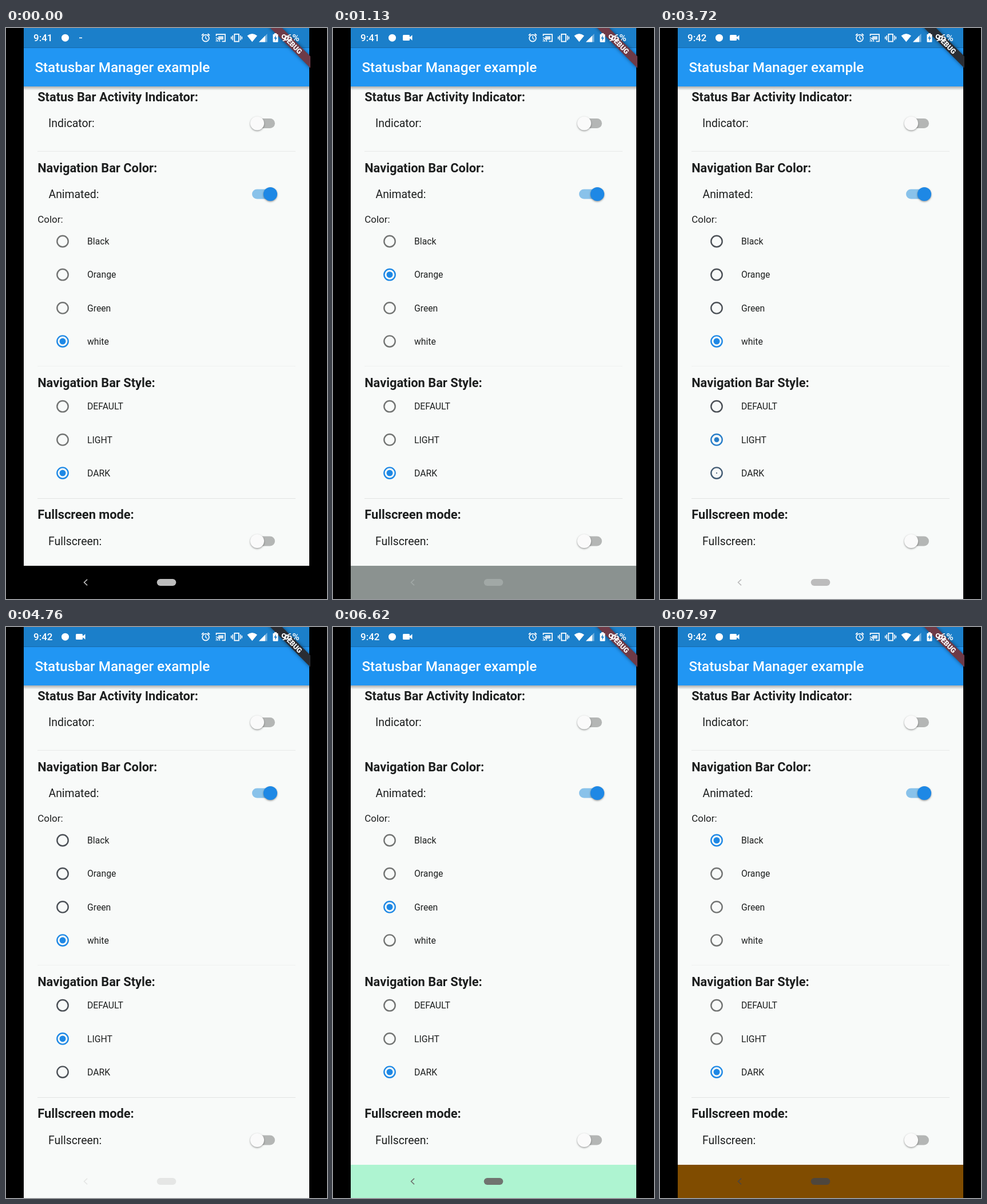
Recreate the animation shown at these times as an HTML page with a canvas. Size 561 by 997 pixels, loop 8000 ms.

```html
<!DOCTYPE html>
<html lang="en">
<head>
<meta charset="utf-8">
<title>Statusbar Manager example</title>
<style>
  html, body { margin: 0; width: 100%; height: 100%; overflow: hidden; background: #000; }
  canvas { display: block; width: 561px; height: 997px; }
</style>
</head>
<body>
<canvas id="stage"></canvas>
<script>
const W = 561, H = 997, LOOP = 8000, STEP = 60;
const LEFT = 31, RIGHT = 530, DP = 1.2125;
const PAGE = '#f8faf9', ACTIVE = '#1e88e5';
const canvas = document.getElementById('stage');
const ctx = canvas.getContext('2d');
const dpr = window.devicePixelRatio || 1;
canvas.width = W * dpr;
canvas.height = H * dpr;

const colors = ['Black', 'Orange', 'Green', 'white'];
const styles = ['DEFAULT', 'LIGHT', 'DARK'];

// Taps: start, steps until settled, resulting changes
const taps = [
  { at: 60, steps: 5, color: 0 },
  { at: 950, steps: 4, color: 1, bar: '#8b9290', keys: '#a1a8a6' },
  { at: 1190, steps: 1, bar: '#ff9800', keys: '#ffdcae' },
  { at: 1850, steps: 5, color: 3, bar: PAGE, keys: '#f4f5f4' },
  { at: 3060, steps: 4, style: 1 },
  { at: 3720, steps: 4, style: 2, keys: '#838383' },
  { at: 4640, steps: 4, style: 1, keys: '#f4f5f4' },
  { at: 5210, steps: 3, style: 0 },
  { at: 5600, steps: 4, style: 2, keys: '#838383' },
  { at: 6490, steps: 5, color: 2, bar: '#7cf0b6', keys: '#6b706b' },
  { at: 7160, steps: 5, color: 1, bar: '#ff9800', keys: '#6f6252' },
  { at: 7850, steps: 6, color: 0, bar: '#000000', keys: '#403a34' }
];

const clamp = v => Math.max(0, Math.min(1, v));
const rgb = c => c[0] === '#'
  ? [1, 3, 5].map(i => parseInt(c.slice(i, i + 2), 16))
  : c.match(/[\d.]+/g).map(Number);

function mix(a, b, p) {
  const to = rgb(b);
  return 'rgb(' + rgb(a).map((v, i) => Math.round(v + (to[i] - v) * p)).join(',') + ')';
}

function stateAt(t) {
  const s = { color: [0, 0, 0, 1], style: [0, 0, 1], bar: '#000000', keys: '#bdbdbd' };
  for (const tap of taps) {
    if (t < tap.at) break;
    const step = Math.floor((t - tap.at) / STEP + 0.001) + 1;
    const p = clamp(step / tap.steps);
    const dot = clamp(0.2 + 0.4 * (step - 1));
    for (const group of ['color', 'style']) {
      if (group in tap) s[group] = s[group].map((v, i) => v + ((i === tap[group]) - v) * dot);
    }
    if (tap.bar) s.bar = mix(s.bar, tap.bar, p);
    if (tap.keys) s.keys = mix(s.keys, tap.keys, Math.sqrt(p));
  }
  return s;
}

function rect(x, y, w, h, fill) {
  ctx.fillStyle = fill;
  ctx.fillRect(x, y, w, h);
}

function disc(x, y, r, fill) {
  ctx.fillStyle = fill;
  ctx.beginPath();
  ctx.arc(x, y, r, 0, Math.PI * 2);
  ctx.fill();
}

function pill(x, y, w, h, r, fill) {
  ctx.fillStyle = fill;
  ctx.beginPath();
  ctx.roundRect(x, y, w, h, r);
  ctx.fill();
}

function line(points, color, width) {
  ctx.strokeStyle = color;
  ctx.lineWidth = width;
  ctx.beginPath();
  points.forEach(([x, y]) => ctx.lineTo(x, y));
  ctx.stroke();
}

function poly(points, fill) {
  ctx.fillStyle = fill;
  ctx.beginPath();
  points.forEach(([x, y]) => ctx.lineTo(x, y));
  ctx.fill();
}

function arc(x, y, r, from, to, color, width) {
  ctx.strokeStyle = color;
  ctx.lineWidth = width;
  ctx.beginPath();
  ctx.arc(x, y, r, from, to);
  ctx.stroke();
}

function text(str, x, y, sp, weight = 400, fill = '#1d1f1f') {
  ctx.font = `${weight} ${sp * DP}px Roboto, sans-serif`;
  ctx.fillStyle = fill;
  ctx.fillText(str, x, y);
}

function shadow(color, blur, dy) {
  ctx.shadowColor = color;
  ctx.shadowBlur = blur * dpr;
  ctx.shadowOffsetY = dy * dpr;
}

function toggle(y, on) {
  pill(430, y - 8.5, 40, 17, 8.5, on ? '#89c2ea' : '#b4b6b5');
  ctx.save();
  shadow('rgba(0,0,0,.4)', 3, 1.3);
  disc(on ? 462 : 439, y, 12.1, on ? ACTIVE : '#fafafa');
  ctx.restore();
}

function radio(y, on, ink) {
  const c = mix(ink, ACTIVE, on);
  arc(99, y, 9.7, 0, Math.PI * 2, c, 2.4);
  if (on > 0) disc(99, y, 5.5 * on, c);
}

function radios(labels, amounts, top, ink) {
  labels.forEach((label, i) => {
    const y = top + i * 48 * DP;
    radio(y, amounts[i], ink);
    text(label, 142, y + 5.6, 13);
  });
}

function page(t, s) {
  const ink = t >= 1970 && t < 6490 ? '#4b5056' : '#727473';
  rect(LEFT, 102, RIGHT - LEFT, 837, PAGE);
  if (t < 6490 || t >= 7410) {
    rect(55, 214.8, 451, 1, '#e6e8e7');
    rect(55, 590, 451, 1, '#eff1f0');
    rect(55, 821, 451, 1, '#e1e3e2');
  }
  text('Status Bar Activity Indicator:', 55.2, 128, 18, 700);
  text('Indicator:', 74, 173.3, 16);
  toggle(166.5, false);

  text('Navigation Bar Color:', 55.2, 251.7, 18, 700);
  text('Animated:', 74.5, 296.8, 16);
  toggle(290, true);
  text('Color:', 55.2, 340, 14);
  radios(colors, s.color, 372.5, ink);

  text('Navigation Bar Style:', 55.2, 627.2, 18, 700);
  radios(styles, s.style, 660.7, ink);

  text('Fullscreen mode:', 55.2, 857.3, 18, 700);
  text('Fullscreen:', 74, 903, 16);
  toggle(896, false);
}

function appBar() {
  const g = ctx.createLinearGradient(0, 102, 0, 109);
  g.addColorStop(0, 'rgba(0,0,0,.3)');
  g.addColorStop(1, 'rgba(0,0,0,0)');
  rect(LEFT, 102, RIGHT - LEFT, 7, g);
  rect(LEFT, 0, RIGHT - LEFT, 34.5, '#1b7fca');
  rect(LEFT, 34.5, RIGHT - LEFT, 67.5, '#2196f3');
  text('Statusbar Manager example', 50.4, 77.3, 20, 500, '#fff');
}

function ribbon(t) {
  ctx.save();
  ctx.beginPath();
  ctx.rect(LEFT, 0, 501, 120);
  ctx.clip();
  ctx.translate(530.5, 0);
  ctx.rotate(Math.PI / 4);
  shadow('rgba(0,0,0,.5)', 6, 0);
  rect(-52, 28 * DP, 104, 12 * DP, t >= 1970 && t < 6490 ? '#2a2d33' : '#6e3a47');
  shadow('transparent', 0, 0);
  ctx.textAlign = 'center';
  text('DEBUG', 0, 45.6, 10.2, 900, '#fff');
  ctx.restore();
}

function statusIcons(t) {
  const c = '#fff';
  text(t < 3060 ? '9:41' : '9:42', 48, 23.4, 14, 500, c);
  disc(103.5, 17.2, 6.5, c);
  if (t < 60) {
    rect(128, 16.5, 5, 1.6, c);
  } else {
    pill(122, 12, 12, 10, 1.5, c);
    poly([[134, 16], [138.5, 12.2], [138.5, 21.8], [134, 18]], c);
  }

  // Alarm clock
  arc(349, 17.8, 5.9, 0, Math.PI * 2, c, 1.7);
  line([[349, 14], [349, 18], [351.8, 20]], c, 1.4);
  line([[342, 13], [345.4, 10]], c, 1.7);
  line([[356, 13], [352.6, 10]], c, 1.7);

  // Cast
  line([[367.5, 14], [367.5, 11.2], [383, 11.2], [383, 23.3], [377.5, 23.3]], c, 1.7);
  for (const r of [3.6, 6.8]) arc(366.8, 24, r, -Math.PI / 2, 0, c, 1.5);
  poly([[366.8, 22], [368.8, 24], [366.8, 24]], c);
  rect(371, 14.3, 9, 6, 'rgba(255,255,255,.8)');

  // Vibrate
  ctx.strokeStyle = c;
  ctx.lineWidth = 1.8;
  ctx.strokeRect(399.3, 10.8, 7.6, 12.8);
  for (const d of [-1, 1]) {
    line([[403 + d * 6.8, 13], [403 + d * 6.8, 21.5]], c, 1.6);
    line([[403 + d * 9.3, 15], [403 + d * 9.3, 19.5]], c, 1.6);
  }

  // Wi-Fi and signal
  ctx.fillStyle = c;
  ctx.beginPath();
  ctx.moveTo(421.5, 13.5);
  ctx.quadraticCurveTo(430.3, 6.5, 439, 13.5);
  ctx.lineTo(430.3, 24.3);
  ctx.fill();
  poly([[442, 24.5], [456.5, 10], [456.5, 24.5]], 'rgba(255,255,255,.4)');
  poly([[442, 24.5], [453, 13.5], [453, 24.5]], c);

  // Battery
  pill(466.5, 10.8, 9, 14, 1, c);
  rect(469, 9, 4, 2, c);
  poly([[471.8, 12.5], [468.3, 18.6], [470.6, 18.6], [470.2, 23], [473.8, 16.8], [471.4, 16.8]], '#1b7fca');
  text('96%', 481, 23.4, 14, 500, c);
}

function navBar(s) {
  rect(LEFT, 939, RIGHT - LEFT, 58, s.bar);
  pill(263.7, 962, 33.6, 12, 6, s.keys);
  line([[142, 962.8], [136.6, 968], [142, 973.2]], s.keys, 1.7);
}

function draw(t) {
  const s = stateAt(t);
  ctx.setTransform(dpr, 0, 0, dpr, 0, 0);
  rect(0, 0, W, H, '#000');
  page(t, s);
  appBar();
  ribbon(t);
  statusIcons(t);
  navBar(s);
}

const start = performance.now();
function tick() {
  draw((performance.now() - start) % LOOP);
  requestAnimationFrame(tick);
}
tick();
</script>
</body>
</html>
```
